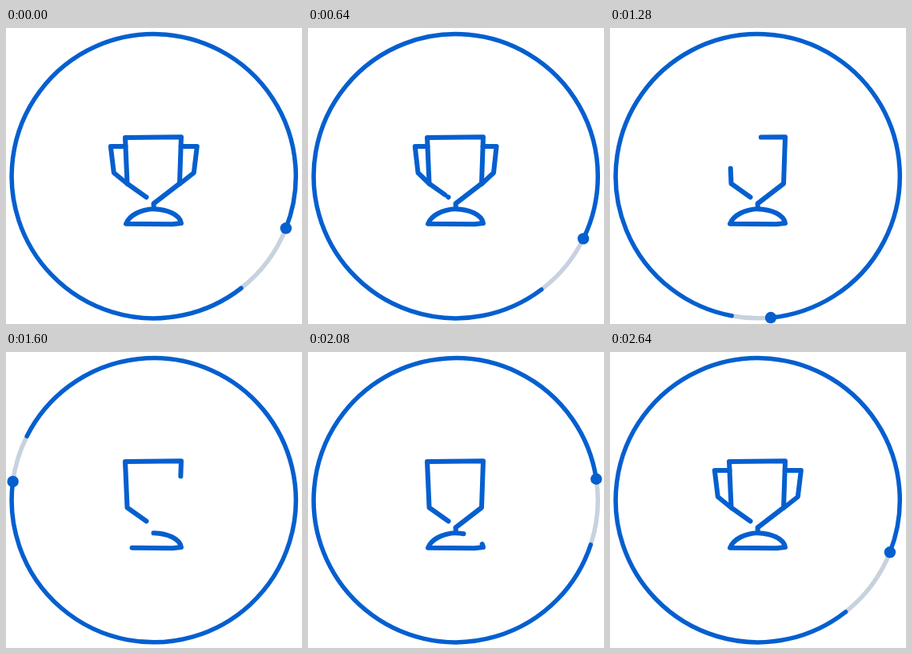
These frames come from a looping animation (370x370 px, 2.68 s). An HTML page:

```html
<!DOCTYPE html>
<html lang="en">
<head>
<meta charset="utf-8">
<title>Trophy progress ring</title>
<style>
  html, body { margin: 0; width: 100%; height: 100%; overflow: hidden; background: #fff; }
  svg { display: block; width: 100vw; height: 100vh; }
  path { fill: none; stroke: #055fcf; stroke-width: 6; stroke-linecap: round; stroke-linejoin: round; }
  #rest, #arc { stroke-width: 5.5; }
  #rest { stroke: #c8d2df; }
  #dot { fill: #055fcf; }
</style>
</head>
<body>
<svg viewBox="0 0 370 370">
  <path id="rest"/>
  <path id="arc"/>
  <circle id="dot" r="7.2"/>
  <path id="handles"/>
  <path id="cup" d="M175.5 211.5 L151.5 194.5 L149 137 L219 136.3 L217 194.5 L184.5 219.5 L185 226
    C168 227 154 234 150 244.8 L208 245.2 L219 244 C217 233 202 227 184.5 226.3"/>
</svg>
<script>
const LOOP = 2680, CX = 184.7, CY = 185.2, R = 177.6;
const $ = id => document.getElementById(id);
const [rest, arc, dot, handles, cup] = ['rest', 'arc', 'dot', 'handles', 'cup'].map($);
const cupLength = cup.getTotalLength();

// Eased 0..1 progress with cubic-bezier(x1, 0, x2, 1), allowed to run past the loop point.
function tween(start, duration, x1, x2) {
  const spill = start + duration - LOOP;
  return t => {
    const u = ((t < spill ? t + LOOP : t) - start) / duration;
    if (u <= 0) return 0;
    if (u >= 1) return 1;
    let lo = 0, hi = 1;
    for (let i = 0; i < 24; i++) {
      const s = (lo + hi) / 2, r = 1 - s;
      if (3 * r * r * s * x1 + 3 * r * s * s * x2 + s * s * s < u) lo = s; else hi = s;
    }
    return lo * lo * (3 - 2 * lo);
  };
}

const dotTurn = tween(313, 2326, .778, .398);
const gapTurn = tween(514, 2200, .729, .311);
const erase = tween(394, 2020, .7, .316);
const redraw = tween(639, 2040, .692, .294);
const foldIn = tween(280, 1005, .7, .3);
const foldOut = tween(2111, 529, .7, .3);

function onRing(deg) {
  const a = deg * Math.PI / 180;
  return [CX + R * Math.cos(a), CY + R * Math.sin(a)];
}

function ringArc(from, to) {
  const large = to - from > 180 ? 1 : 0;
  return `M${onRing(from)} A${R} ${R} 0 ${large} 1 ${onRing(to)}`;
}

function drawRing(t) {
  const a = 21.5 + 360 * dotTurn(t);
  let b = 52.1 + 360 * gapTurn(t);
  if (b - a > 180) b -= 360;
  rest.setAttribute('d', ringArc(a, b));
  arc.setAttribute('d', ringArc(b, a + 360));
  const [x, y] = onRing(a);
  dot.setAttribute('cx', x);
  dot.setAttribute('cy', y);
}

function drawCup(t) {
  const head = cupLength * redraw(t) + .01;
  const tail = Math.max(head, cupLength * erase(t));
  cup.setAttribute('stroke-dasharray', `${head} ${tail - head} ${cupLength - tail + 1} 0`);
}

function drawHandles(t) {
  const fold = foldIn(t) - foldOut(t);
  handles.setAttribute('visibility', fold > .95 ? 'hidden' : 'visible');
  handles.setAttribute('d',
    `M149.5 148 H${130.8 + 18 * fold} L${134.8 + 16.5 * fold} 181 L152 195` +
    `M218.7 148 H${238.8 - 19.5 * fold} L${234.8 - 17 * fold} 181 L217 195`);
}

function frame(now) {
  const t = now % LOOP;
  drawRing(t);
  drawCup(t);
  drawHandles(t);
  requestAnimationFrame(frame);
}
requestAnimationFrame(frame);
</script>
</body>
</html>
```
